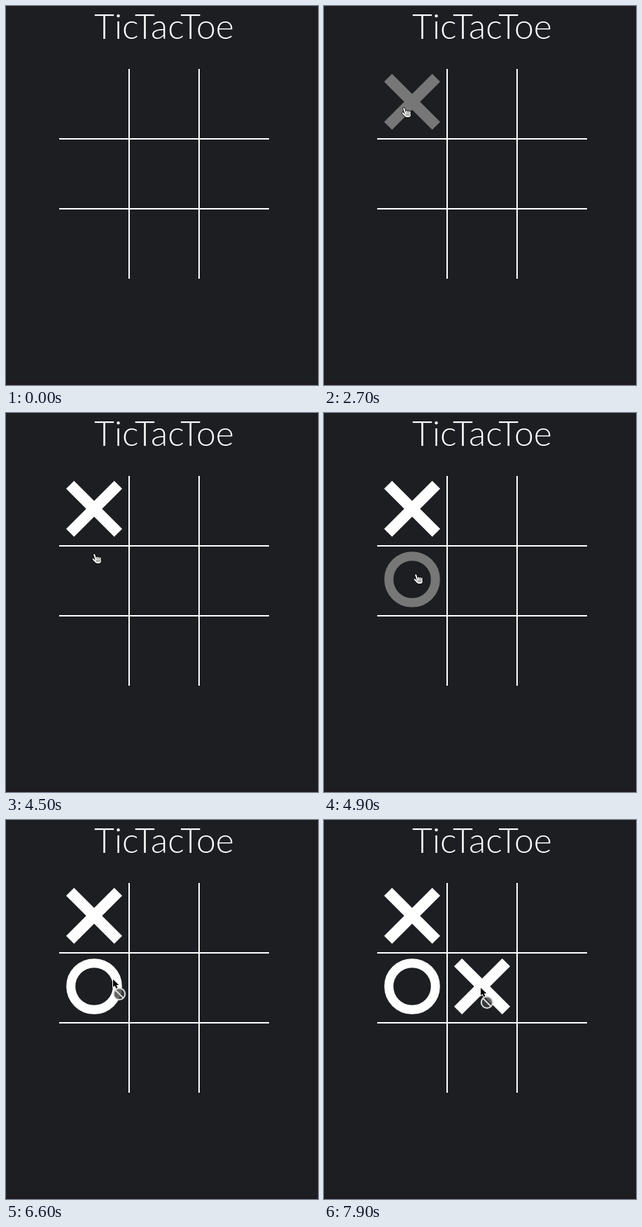
Write an HTML page with a canvas that moves like this. It is 446 by 542 pixels and loops after 8 s.

```html
<!DOCTYPE html>
<html lang="en">
<head>
<meta charset="utf-8">
<title>TicTacToe</title>
<style>
  html, body { margin: 0; width: 100%; height: 100%; overflow: hidden; background: #1d1e22; }
  canvas { display: block; }
</style>
</head>
<body>
<canvas id="stage" width="446" height="542"></canvas>
<script>
const ctx = document.getElementById('stage').getContext('2d');
const LOOP = 8000, STEP = 100, CELL = 100, LEFT = 76, TOP = 90, REACH = 40;
const BG = '#1d1e22', GHOST = '#777', WHITE = '#fff';

// The pointer rests between glides.
const entry = { x: -14, y: 127 };
const glides = [
  { from: 1000, to: 1400, x: 77, y: 142 },
  { from: 1800, to: 2500, x: 109, y: 138 },
  { from: 2600, to: 2800, x: 118, y: 144 },
  { from: 3900, to: 4900, x: 131, y: 226 },
  { from: 6300, to: 7100, x: 197, y: 225 },
  { from: 7100, to: 7400, x: 223, y: 238 }
];

const moves = [
  { time: 3300, mark: 'X', col: 0, row: 0 },
  { time: 6000, mark: 'O', col: 0, row: 1 },
  { time: 7900, mark: 'X', col: 1, row: 1 }
];

const center = ({ col, row }) => [LEFT + 50 + col * CELL, Math.round(137.4 + row * 100.4)];

function smooth(from, to, t) {
  const k = Math.min(1, Math.max(0, (t - from) / (to - from)));
  return k * k * (3 - 2 * k);
}

function pointerAt(t) {
  let { x, y } = entry;
  for (const g of glides) {
    const k = smooth(g.from, g.to, t);
    x += (g.x - x) * k;
    y += (g.y - y) * k;
  }
  return [Math.round(x), Math.round(y)];
}

function line(x0, y0, x1, y1, color, width) {
  ctx.strokeStyle = color;
  ctx.lineWidth = width;
  ctx.beginPath();
  ctx.moveTo(x0, y0);
  ctx.lineTo(x1, y1);
  ctx.stroke();
}

function ring(x, y, radius, color, width) {
  ctx.strokeStyle = color;
  ctx.lineWidth = width;
  ctx.beginPath();
  ctx.arc(x, y, radius, 0, Math.PI * 2);
  ctx.stroke();
}

function drawMark(move, color) {
  const [x, y] = center(move), r = 34.4;
  if (move.mark === 'O') {
    ring(x, y, 33.3, color, 13);
    return;
  }
  line(x - r, y - r, x + r, y + r, color, 16);
  line(x - r, y + r, x + r, y - r, color, 16);
}

function drawArrow() {
  const shape = new Path2D('M1 2V13L3.6 10.7L5.6 15.2L7.6 14.3L5.7 9.9H9.3Z');
  ctx.lineJoin = 'round';
  ctx.lineWidth = 2;
  ctx.strokeStyle = WHITE;
  ctx.stroke(shape);
  ctx.fillStyle = '#000';
  ctx.fill(shape);
}

function drawForbidden() {
  drawArrow();
  ctx.translate(10, 22.8);
  ctx.fillStyle = 'rgba(62,62,64,.8)';
  ctx.beginPath();
  ctx.arc(0, 0, 8, 0, Math.PI * 2);
  ctx.fill();
  ring(0, 0, 8.2, '#ddd', 2);
  line(-5.6, -5.6, 5.6, 5.6, '#ddd', 2);
}

function drawHand() {
  ctx.translate(-3, 4);
  ctx.lineCap = 'round';
  for (const [color, extra] of [['#000', 1.6], [WHITE, 0]]) {
    line(3.2, 1.6, 5.6, 9, color, 2 + extra);
    line(1.6, 8, 5, 11.5, color, 2 + extra);
    line(7.5, 11, 9.8, 11, color, 6 + extra);
    for (let i = 0; i < 3; i++) line(7.2 + 2.3 * i, 5.4 + 0.5 * i, 7.2 + 2.1 * i, 10, color, 1.7 + extra);
  }
  for (let i = 0; i < 3; i++) line(6.6 + 2 * i, 9, 6.6 + 2 * i, 11.8, '#333', 0.8);
}

function drawPointer([x, y], placed) {
  const col = Math.floor((x - LEFT) / CELL), row = Math.floor((y - TOP) / CELL);
  const onBoard = [col, row].every(n => n >= 0 && n < 3);
  const taken = placed.some(m => m.col === col && m.row === row);
  ctx.save();
  ctx.translate(x, y);
  (!onBoard ? drawArrow : taken ? drawForbidden : drawHand)();
  ctx.restore();
}

function drawBoard() {
  ctx.fillStyle = BG;
  ctx.fillRect(0, 0, 446, 542);
  ctx.fillStyle = '#1e1b20';
  ctx.fillRect(0, 538, 446, 4);
  ctx.fillStyle = WHITE;
  ctx.font = '300 50px Lato, sans-serif';
  ctx.textAlign = 'center';
  ctx.fillText('TicTacToe', 226, 47);
  for (const i of [1, 2]) {
    ctx.fillRect(LEFT + i * CELL - 1, TOP, 2, 300);
    ctx.fillRect(LEFT, TOP + i * CELL - 1, 300, 2);
  }
}

function render(now) {
  const t = Math.floor((now % LOOP) / STEP) * STEP;
  const placed = moves.filter(m => m.time <= t);
  const next = moves[placed.length];
  const pointer = pointerAt(t);

  drawBoard();
  placed.forEach(m => drawMark(m, WHITE));
  if (next && center(next).every((c, i) => Math.abs(pointer[i] - c) <= REACH)) drawMark(next, GHOST);
  drawPointer(pointer, placed);
}

const start = performance.now();
function tick() {
  render(performance.now() - start);
  requestAnimationFrame(tick);
}
tick();
</script>
</body>
</html>
```
